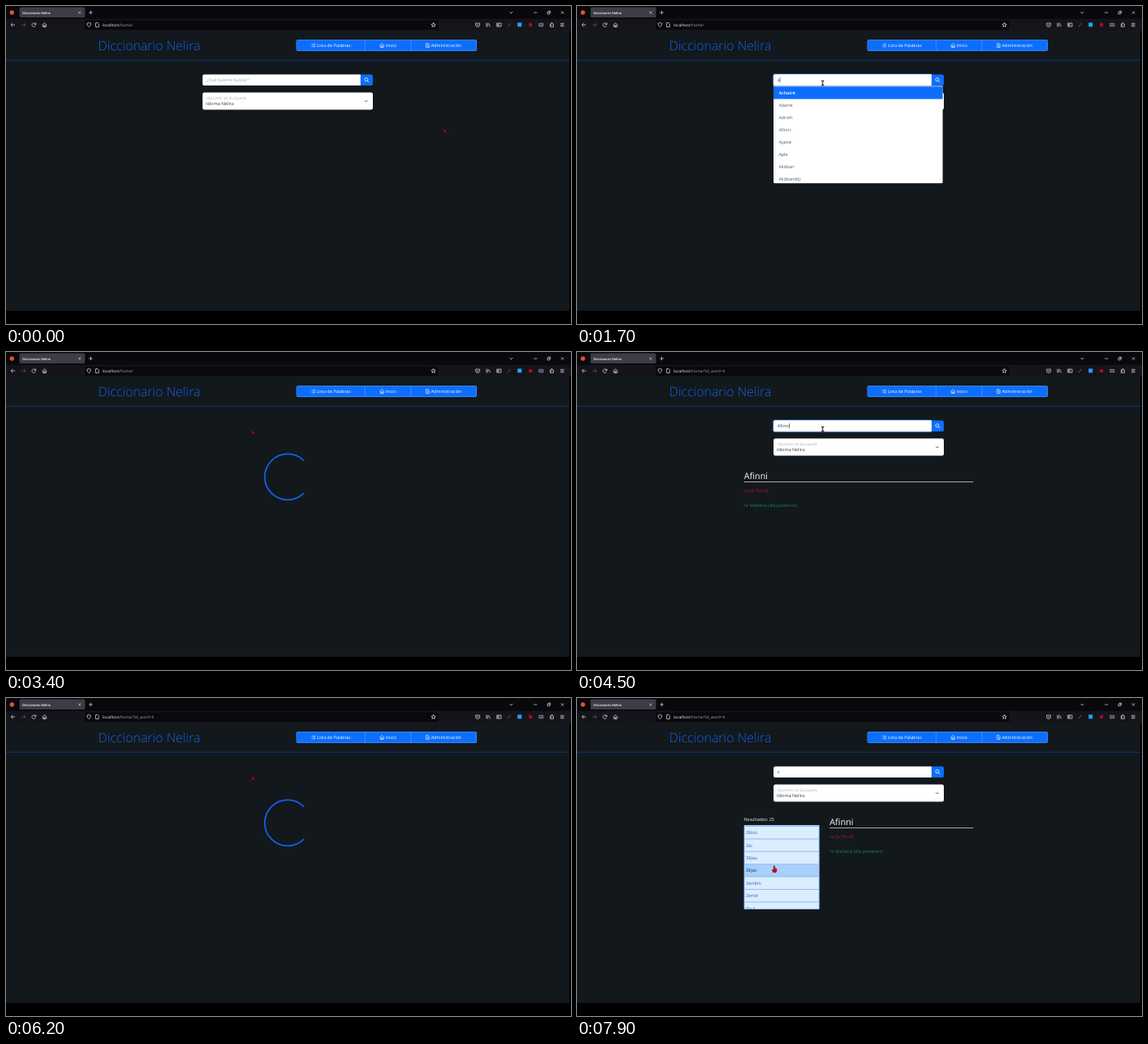
Recreate the animation shown at these times as an HTML page with a canvas. Size 690x388 px, loop 8000 ms.

```html
<!DOCTYPE html>
<html lang="es">
<head>
<meta charset="utf-8">
<title>Diccionario Nelira</title>
<style>
  html, body { margin: 0; width: 100%; height: 100%; overflow: hidden; background: #000; }
  canvas { display: block; width: 690px; height: 388px; }
</style>
</head>
<body>
<canvas id="stage"></canvas>
<script>
const LOOP = 8000, STEP = 100;
const BLUE = '#0d6efd', PAGE = '#13181c', WHITE = '#fff';
const SIZE = 5.45, ROW = 15.4, ITEM = 15.05;
const A_WORDS = ['Achatrë', 'Adartë', 'Adrieh', 'Afinni', 'Ajatsë', 'Aple', 'Akâban', 'Akâban(ëj)'];
const Z_WORDS = ['Zâldorë', 'Zannenfôt', 'Zâta', 'Zâtcü', 'Zei', 'Zêjau', 'Zêjav', 'Zertêm', 'Zertië', 'Zeul', 'Zeun'];

// Pointer hot spot: time, x, y
const POINTER = [
  [0, 535, 150], [100, 562, 128], [200, 601, 72], [300, 545, 27], [400, 415, 68], [500, 300, 94],
  [6900, 300, 94], [7000, 297, 104], [7100, 285, 134], [7200, 267, 167], [7300, 252, 188],
  [7400, 249, 192], [7700, 247, 194], [7800, 244, 199], [7900, 241, 205]
];
const SCROLL = [[0, 0], [7400, 0], [7500, 12], [7600, 30], [7700, 41], [7800, 45.5]];

const canvas = document.getElementById('stage');
const ctx = canvas.getContext('2d');
const dpr = window.devicePixelRatio || 1;
canvas.width = 690 * dpr;
canvas.height = 388 * dpr;

const within = (t, from, to) => t >= from && t < to;

function sample(table, t) {
  const i = table.findIndex(row => row[0] > t);
  if (i < 0) return table[table.length - 1].slice(1);
  const a = table[i - 1], b = table[i], k = (t - a[0]) / (b[0] - a[0]);
  return a.slice(1).map((v, n) => v + (b[n + 1] - v) * k);
}

function rect(x, y, w, h, color, radius = 0) {
  ctx.fillStyle = color;
  ctx.beginPath();
  ctx.roundRect(x, y, w, h, radius);
  ctx.fill();
}

function circle(x, y, r, color) {
  rect(x - r, y - r, 2 * r, 2 * r, color, r);
}

function text(str, x, y, color, size = SIZE, weight = 400) {
  ctx.font = `${weight} ${size}px "Open Sans", "Noto Sans", sans-serif`;
  ctx.fillStyle = color;
  ctx.fillText(str, x, y);
  return x + ctx.measureText(str).width;
}

// Stroke a path given relative to a centre point
function icon(x, y, d, color = '#e4e4ea', width = 0.7) {
  ctx.save();
  ctx.translate(x, y);
  ctx.strokeStyle = color;
  ctx.lineWidth = width;
  ctx.stroke(new Path2D(d));
  ctx.restore();
}

const HOUSE = 'M-2.7 .2L0-2.4L2.7 .2M-2-.3V2.4H2V-.3M-.6 2.4V.7H.6V2.4';
const SHEET = 'M-1.8-2.5H.7L1.9-1.3V2.5H-1.8Z';
const CROSS = 'M-1.5-1.5L1.5 1.5M1.5-1.5L-1.5 1.5';
const CHEVRON = 'M-1.8-.8L0 1L1.8-.8';
const HOOK = 'M-2.3-2V-.6Q-2.3 .4-1.2 .4H2.1M.6-1.2L2.2 .4L.6 2';

function browser(hasWord) {
  rect(0, 0, 690, 15.5, '#08080d');
  rect(0, 15.5, 690, 14.5, '#15141b');
  rect(16.5, 1.5, 80, 12.5, '#3d3c47', 1.5);
  circle(7.2, 8, 2.7, '#e2502f');
  text('Diccionario Nelira', 20, 9.5, WHITE, 4, 600);
  icon(90, 8, CROSS, '#ddd', 0.6);
  icon(103.5, 8, 'M-2.2 0H2.2M0-2.2V2.2');
  icon(617, 8, CHEVRON);
  icon(646.5, 8, 'M-2 0H2');
  icon(663, 8, 'M-1.8-.8H.8V1.8H-1.8ZM-.8-1.8H1.8V.8');
  icon(679.5, 8, CROSS);

  icon(8.5, 23, 'M2.5 0H-2.3M-.2-2.2L-2.4 0L-.2 2.2');
  icon(21.5, 23, 'M-2.5 0H2.3M.2-2.2L2.4 0L.2 2.2', '#62616b');
  icon(34, 23, 'M2.2-.6A2.3 2.3 0 1 0 2.1 1M2.4-2.5V-.5H.4');
  icon(47, 23, HOUSE);
  rect(96.5, 17.5, 431.5, 11.5, '#08080d', 1.5);
  icon(101.3, 23, 'M0-2.6L2.3-1.8Q2.3 1.5 0 2.6Q-2.3 1.5-2.3-1.8Z');
  icon(111.3, 23, SHEET);
  const end = text('localhost', 118, 24.8, '#f4f4f8', 4.85);
  text('/home/' + (hasWord ? '?id_word=4' : ''), end, 24.8, '#a0a0a8', 4.85);
  icon(522, 23, 'M0-2.7L.8-.8L2.7-.7L1.2 .5L1.7 2.4L0 1.3L-1.7 2.4L-1.2 .5L-2.7-.7L-.8-.8Z');
  icon(576, 23, 'M-2.4-2H2.4V0A2.4 2.4 0 0 1-2.4 0ZM-1.2-.5L0 .6L1.2-.5');
  icon(589, 23, 'M-2.2-2.3V2.4M-.8-2.3V2.4M.6-2L2.3 2.3');
  icon(602, 23, 'M-2.7-2H2.7V2H-2.7ZM-.2-2V2M-2-.8H-.8M-2 .4H-.8');
  icon(614.5, 23, 'M-1.8 2L.2-.3M.2-1.8L1.8-.3', '#8d8d96');
  rect(624.7, 20.3, 5, 5, '#20a4f3');
  circle(640.5, 23, 2.2, '#b00c20');
  icon(653.5, 23, 'M-2.5-1.7H2.5V1.7H-2.5ZM-1.3-.6V.7M.2-.6V.7M1.4-.6V.7', '#b4b4bc');
  icon(666.5, 23, 'M-2-1H-.7V-2.3H.7V-1H2V2.3H-2V.9H-.8V-.1H-2Z');
  icon(679.3, 23, 'M-2.2-1.7H2.2M-2.2 0H2.2M-2.2 1.7H2.2');
}

function header() {
  rect(0, 30, 688, 342, PAGE);
  rect(0, 65.7, 688, 0.7, '#0c4296');
  text('Diccionario Nelira', 112.6, 53.8, '#0d63e6', 15.8, 300);
  rect(354.5, 41, 220.5, 14, '#4aa3ff', 2.3);
  rect(355, 41.5, 219.5, 13, BLUE, 1.9);
  for (const x of [438.4, 494.3]) rect(x, 41.2, 0.6, 13.6, '#4aa3ff');
  icon(375.3, 48, 'M-2.6-1.7H-1.9M-2.6 0H-1.9M-2.6 1.7H-1.9M-1.1-1.7H2.6M-1.1 0H2.6M-1.1 1.7H2.6', WHITE, 0.55);
  text('Lista de Palabras', 379.5, 50, WHITE, 5.3, 500);
  icon(459.2, 48, HOUSE, WHITE, 0.6);
  text('Inicio', 463.5, 50, WHITE, 5.3, 500);
  icon(514.8, 48, SHEET + 'M-.8-.3H.9M-.8 .9H.9', WHITE, 0.6);
  text('Administración', 519, 50, WHITE, 5.3, 500);
}

function caretX(t) {
  if (within(t, 800, 1300)) return 244.9;
  if (within(t, 1500, 1900) || within(t, 2400, 2900) || within(t, 5500, 6000)) return 247.7;
  return within(t, 4400, 4800) ? 259.5 : 0;
}

function searchForm(t) {
  const start = within(t, 700, 3400) ? 700 : within(t, 4300, 6200) ? 4300 : null;
  if (start !== null) {
    const glow = Math.min(1, (t - start + 50) / 200);
    rect(238.6, 82.1, 195.7, 16.4, `rgba(13,110,253,${0.3 * glow})`, 3);
    rect(239.6, 83.1, 193.9, 14.4, `rgba(134,183,254,${glow})`, 2.2);
  }
  rect(240, 83.5, 193.2, 13.6, WHITE, [2.2, 0, 0, 2.2]);
  rect(433.2, 83.5, 14.8, 13.6, BLUE, [0, 2.2, 2.2, 0]);
  icon(440.5, 90.2, 'M1.4-.5A2 2 0 1 1-2.6-.5A2 2 0 1 1 1.4-.5M.9 1L2.9 3', WHITE, 0.75);

  const selected = within(t, 5000, 5500);
  if (selected) rect(244.6, 86.8, 15, 7, '#0a78d7');
  if (t < 1500) text('¿Que quieres buscar?', 244.8, 92.3, '#70777e', 5.35, 300);
  else text(t < 3400 ? 'a' : t < 5500 ? 'Afinni' : 'z', 244.8, 92.3, selected ? WHITE : '#42474c');
  const caret = caretX(t);
  if (caret) rect(caret, 87, 0.5, 6.4, '#222');

  rect(240, 105.6, 208, 20.9, WHITE, 2.2);
  text('Opciones de Busqueda', 244.8, 114.2, '#878c91', 4.65, 300);
  text('Idioma Nelira', 243.9, 121, '#3a3f44', SIZE);
  icon(440, 116, CHEVRON, '#343a40', 0.7);
}

function dropdown(words, active) {
  const left = 240, top = 98.2, width = 206.6;
  rect(left, 97.4, width, 118.8, WHITE, [0, 0, 1.5, 1.5]);
  words.forEach((word, i) => {
    const on = i === active;
    if (on) rect(left, top + i * ITEM, width, 15.3, BLUE);
    text(word, 246.4, 107.9 + i * ITEM, on ? WHITE : '#565b60', 5.4, on ? 600 : 400);
  });
}

function entry(x) {
  text('Afinni', x, 155, WHITE, 10.7);
  rect(x, 158.2, 484 - x, 0.9, '#d5d7d9');
  [["[a-'fin-ni]", 169.5, '#b8143f'], ['Mañana (día posterior)', 187, '#198754']].forEach(([str, y, color]) => {
    icon(x + 2.6, y, HOOK, color, 0.6);
    text(str, x + 7, y + 1.9, color);
  });
}

function results(t, pointerX, pointerY) {
  const top = 155.8, [scroll] = sample(SCROLL, t);
  text('Resultados: 25', 204, 150, '#f2f3f5');
  rect(203.8, 155, 92.4, 102.8, '#8dbcfb', 1);
  ctx.save();
  ctx.beginPath();
  ctx.rect(204.8, top, 90.4, 101.4);
  ctx.clip();
  Z_WORDS.forEach((word, i) => {
    const y = top + i * ROW - scroll;
    const hover = pointerX < 296 && pointerY >= Math.max(y, top) && pointerY < y + ROW;
    rect(204.8, y + 0.5, 90.4, ROW - 1, hover ? '#a9cffa' : '#dcedff');
    text(word, 206.4, y + 9.7, hover ? '#0b2f78' : '#3c62b4', SIZE);
  });
  ctx.restore();
}

function spinner(elapsed) {
  const turn = elapsed / 750 * 2 * Math.PI;
  ctx.strokeStyle = '#1161e4';
  ctx.lineWidth = 1.8;
  ctx.beginPath();
  ctx.arc(344, 152.4, 28, turn + Math.PI / 4, turn + Math.PI * 7 / 4);
  ctx.stroke();
}

function pointer(x, y, kind) {
  if (kind === 'beam') {
    icon(x, y, 'M-1.7-2.8H1.7M0-2.8V2.8M-1.7 2.8H1.7', '#3a0508', 1.1);
    return;
  }
  const shape = kind === 'hand'
    ? 'M-.8 0H.5V2.8L2.8 3.5V6L2 7.8H-1.2L-2.8 5L-2.2 4.2L-.8 5Z'
    : 'M0 0L3.2 3.1L2 3.4L2.5 4.6L1.6 4.9L1 3.7L0 4.5Z';
  ctx.save();
  ctx.translate(x, y);
  ctx.fillStyle = '#d3000c';
  ctx.strokeStyle = '#5d0006';
  ctx.lineWidth = 0.5;
  const path = new Path2D(shape);
  ctx.fill(path);
  ctx.stroke(path);
  ctx.restore();
}

function draw(t) {
  ctx.setTransform(dpr, 0, 0, dpr, 0, 0);
  ctx.textRendering = 'geometricPrecision';
  rect(0, 0, 690, 388, '#000');
  browser(t >= 3500);
  header();

  const [x, y] = sample(POINTER, t);
  const loadStart = within(t, 3400, 3600) ? 3400 : within(t, 6200, 6400) ? 6200 : null;
  if (loadStart !== null) {
    spinner(t - loadStart);
    pointer(x + 0.3, y + 1.5, 'arrow');
    return;
  }

  searchForm(t);
  if (within(t, 3600, 6200)) entry(204);
  if (t >= 6400) {
    entry(308.6);
    results(t, x, y);
  }
  if (within(t, 1600, 3400)) dropdown(A_WORDS, [2700, 2900, 3100].filter(at => t >= at).length);
  if (within(t, 5500, 5900)) dropdown(Z_WORDS.slice(0, 8), 0);

  const kind = within(t, 500, 7000) ? 'beam' : t >= 7000 && y > 155.8 ? 'hand' : 'arrow';
  pointer(x, y, kind);
}

function frame() {
  draw(Math.floor(performance.now() % LOOP / STEP) * STEP);
  requestAnimationFrame(frame);
}
frame();
</script>
</body>
</html>
```
